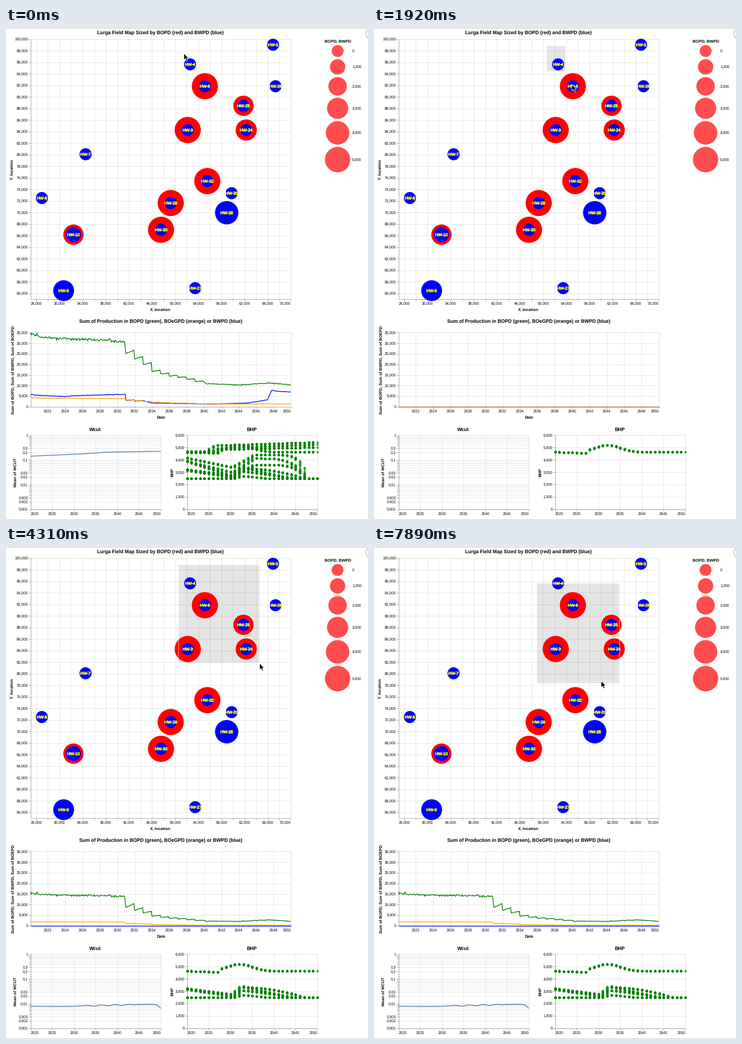
A matplotlib script for the animation above (8000 ms loop, 643x871 px).

```python
import numpy as np
import matplotlib.pyplot as plt
from matplotlib.animation import FuncAnimation
from matplotlib.patches import Circle, Polygon, Rectangle
from matplotlib.patheffects import withStroke

W, H, DPI = 643, 871, 72  # at 72 dpi one point is one pixel
LOOP_MS, FRAMES = 8000, 54
LABEL, AXIS_TITLE, TITLE = 6.6, 7.25, 8.57
HAIR = 0.66

plt.rcParams.update({"font.family": "Liberation Sans", "text.hinting": "none",
                     "lines.solid_capstyle": "butt"})
fig = plt.figure(figsize=((W + 1e-6) / DPI, (H + 1e-6) / DPI), dpi=DPI,
                 facecolor="white")


def layer(zorder):
    ax = fig.add_axes([0, 0, 1, 1], zorder=zorder)
    ax.set(xlim=(0, W), ylim=(H, 0))
    ax.axis("off")
    return ax


def text(ax, x, y, s, size=LABEL, ha="center", bold=False, upright=False, **kw):
    """Place text with its capitals centred on y (or on x when upright)."""
    shift = 0.36 * size
    x, y = (x + shift, y) if upright else (x, y + shift)
    return ax.text(x, y, s, size=size, ha=ha, va="baseline",
                   weight="bold" if bold else "normal",
                   rotation=90 if upright else 0, rotation_mode="anchor", **kw)


def rule(ax, xs, ys, color="#dddddd", z=1):
    ax.plot(xs, ys, color=color, lw=HAIR, zorder=z)


class Panel:
    """A plot rectangle with linear or logarithmic scales in stage pixels."""

    def __init__(self, ax, box, xdom, ydom, log=False):
        self.ax, self.xdom, self.log = ax, xdom, log
        self.x0, self.y0, self.x1, self.y1 = box
        self.ydom = np.log10(ydom) if log else ydom

    def px(self, v):
        return np.interp(v, self.xdom, (self.x0, self.x1))

    def py(self, v):
        return np.interp(np.log10(v) if self.log else v, self.ydom, (self.y1, self.y0))

    def border(self):
        rule(self.ax, [self.x0, self.x1, self.x1], [self.y0, self.y0, self.y1])
        rule(self.ax, [self.x0, self.x0, self.x1], [self.y0, self.y1, self.y1],
             "#888888", 2)

    def x_axis(self, ticks, labelled, fmt="{}"):
        for v in ticks:
            x = self.px(v)
            rule(self.ax, [x, x], [self.y0, self.y1])
            rule(self.ax, [x, x], [self.y1, self.y1 + 3.3], "#888888", 2)
            if v in labelled:
                ha = {self.xdom[0]: "left", self.xdom[1]: "right"}.get(v, "center")
                text(self.ax, x, self.y1 + 8, fmt.format(v), ha=ha)

    def y_axis(self, ticks, labelled, fmt="{:,}"):
        for v in ticks:
            y = self.py(v)
            rule(self.ax, [self.x0, self.x1], [y, y])
            rule(self.ax, [self.x0 - 3.3, self.x0], [y, y], "#888888", 2)
            if v in labelled:
                text(self.ax, self.x0 - 4.5, y, fmt.format(v), ha="right")


YEARS = (2020, 2050)


def prod_panel(ax):
    return Panel(ax, (43.5, 540.5, 506, 672), YEARS, (0, 35000))


def wcut_panel(ax, dy=0):
    return Panel(ax, (43.5, 722.5 + dy, 275, 854 + dy), YEARS, (0.001, 1), log=True)


def bhp_panel(ax, dx=0, dy=0):
    return Panel(ax, (321.5 + dx, 722.5 + dy, 553 + dx, 854 + dy), YEARS, (0, 6000))


def draw_layout(ax, filled):
    """Axes of the lower charts and the legend; they shift when no data is shown."""
    dx, dy = (0, 0) if filled else (-1, -8.7)
    prod, wcut, bhp = prod_panel(ax), wcut_panel(ax, dy), bhp_panel(ax, dx, dy)
    if filled:
        two_years, five_years = range(2022, 2051, 2), range(2020, 2051, 5)
        prod.x_axis(two_years, two_years)
        for panel in (wcut, bhp):
            panel.x_axis(five_years, five_years)
    for panel, step in ((prod, 5000), (bhp, 1000)):
        ticks = range(0, panel.ydom[1] + 1, step)
        panel.y_axis(ticks, ticks)
    minor = [round(m * 10.0 ** e, 3) for e in (-3, -2, -1) for m in range(1, 10)] + [1]
    wcut.y_axis(minor, [v for v in minor if f"{v:g}"[-1] in "123"], "{:g}")
    for panel in (prod, wcut, bhp):
        panel.border()

    text(ax, 275, 690 if filled else 678.5, "Date", AXIS_TITLE, bold=True)
    text(ax, 159, 711.5 + dy, "Wcut", TITLE, bold=True)
    text(ax, 437 + dx, 711.5 + dy, "BHP", TITLE, bold=True)
    text(ax, 16.5, 788 + dy, "Mean of WCUT", AXIS_TITLE, bold=True, upright=True)
    text(ax, 294.5 + dx, 788 + dy, "BHP", AXIS_TITLE, bold=True, upright=True)

    dx *= 1.6
    text(ax, 566 + dx, 23, "BOPD, BWPD", AXIS_TITLE, ha="left", bold=True)
    for i, y in enumerate((40.8, 69, 103.5, 142.5, 186, 233.5)):
        r = 10.5 + 3.3 * i - 0.18 * i * i
        ax.add_patch(Circle((589 + dx, y), r, fc="#ff4c4c", lw=0))
        text(ax, 615 + dx, y, f"{i * 1000:,}", ha="left")


# ---- data -------------------------------------------------------------------

MONTHS = np.arange(2020, 2050.01, 1 / 12)


def curve(knots, t=MONTHS):
    return np.interp(t, *zip(*knots))


def jitter(amount, seed):
    noise = np.random.default_rng(seed).normal(0, amount, MONTHS.size)
    return noise * np.where(MONTHS < 2031, 1, 0.35)


STEPS = (1, 0.8, 0.6, 0.36, 0.28, 0.22, 0.18, 0.13, 0.07)


def oil(start, plateau, first, tail, rise=0.2, bump=1.3, power=1.0):
    """Plateau, then yearly drops with a partial recovery inside each year."""
    knots = [(2020, start), (2021.5, 0.35 * start + 0.65 * plateau),
             (2029, plateau), (2030.85, plateau * 0.965)]
    for k, share in enumerate(STEPS):
        v = tail + (first - tail) * share ** power
        knots += [(2031 + k, v), (2031.93 + k, v * (1 + rise * 0.8 ** k))]
    knots += [(2040.2, tail * 1.04), (2044, tail * 0.98), (2046.8, tail * bump),
              (2048, tail * bump), (2050, tail * 0.98)]
    return curve(knots)


OIL = {-1: oil(34900, 31400, 25200, 10500, rise=0.06, bump=1.06, power=0.85),
       1: np.zeros(MONTHS.size),
       2: oil(5050, 5000, 3750, 950, bump=1.2),
       3: oil(7500, 7050, 4800, 1150),
       5: oil(15600, 14200, 8700, 2100)}
OIL[4] = (OIL[3] + OIL[5]) / 2

WATER_ALL = curve([
    (2020, 6000), (2020.5, 5500), (2024, 4900), (2026, 5400), (2030.95, 5900),
    (2031, 2900), (2031.95, 3400), (2032, 2600), (2032.9, 3000), (2034, 1800),
    (2038, 1500), (2041, 1300), (2045, 1800), (2047.3, 3300), (2047.8, 7900),
    (2048.2, 7400), (2050, 7000)])
WCUT_ALL = curve([(2020, .142), (2030, .17), (2035, .19), (2037, .207), (2050, .226)])
WAVE = 0.4 * np.sin(2 * np.pi * (MONTHS - 2032.2) / 3.2)
WCUT_SOME = 1e-3 * (
    curve([(2020, 7.9), (2028, 7.7), (2032, 8.1), (2044, 9.2), (2048, 9.5), (2049, 9),
           (2050, 6.5)]) + np.where(abs(MONTHS - 2038) < 5.8, WAVE, 0))
FLOOR = 2500


def shut_in(t):
    bump = 4650 + 560 * np.exp(-((t - 2032.5) / 4) ** 2)
    return np.where(t < 2028, 4650 - 12 * (t - 2020), bump)


def flowing(start, low, peak, peak_year, end, bend):
    """Decline, jump to a peak, then sink to the floor pressure."""
    def pressure(t):
        early = curve([(2020, start), (2030.9, low), (peak_year, peak)], t)
        late = np.clip((t - peak_year) / (end - peak_year), 0, 1)
        return early - (peak - FLOOR) * late ** bend
    return pressure


def rising(low, year, middle, high):
    return lambda t: curve([(year, low), (year + 2, middle), (2050, high)], t)


# In the order in which the brush reaches the wells.
PRESSURE = [
    shut_in,
    flowing(3250, 2750, 3430, 2033, 2045, 0.9),
    flowing(FLOOR, FLOOR, 3080, 2033, 2045, 1.2),
    flowing(3180, 2600, 3330, 2033, 2047.5, 2),
    flowing(FLOOR, FLOOR, 2690, 2033, 2039, 1.5),
    rising(4700, 2024.9, 5180, 5430),
    rising(4660, 2025.9, 4980, 5250),
    rising(4630, 2026.9, 4870, 5020),
    flowing(4200, 3400, 4420, 2036, 2047.9, 8),
    flowing(3930, 3000, 4130, 2036, 2047.9, 4),
    flowing(3950, 2700, 3620, 2036, 2047.9, 5),
]


def draw_data(ax, n):
    prod, wcut, bhp = prod_panel(ax), wcut_panel(ax), bhp_panel(ax)
    x = prod.px(MONTHS)
    rate = OIL[n]
    noise = 330 if n < 0 else 0.016 * rate[0]
    water = WATER_ALL + jitter(110, 5) if n < 0 else np.full(MONTHS.size, 60)
    for values, color in ((rate + jitter(noise, 3), "green"), (water, "blue"),
                          (rate * 0.125 + jitter(noise / 12, 4), "orange")):
        ax.plot(x, prod.py(values), color=color, lw=1.32, solid_joinstyle="round")
    if n < 0 or n >= 4:
        share = WCUT_ALL if n < 0 else WCUT_SOME
        ax.plot(wcut.px(MONTHS), wcut.py(share), color="#4c78a8", lw=1.32)
    t = np.append(np.arange(2020, 2050, 1 / 6), 2050)
    for pressure in PRESSURE if n < 0 else PRESSURE[:n]:
        ax.plot(bhp.px(np.floor(t + 1e-6)), bhp.py(pressure(t)), "o", color="green",
                ms=4.2, mew=0, alpha=0.7)


# ---- field map ----------------------------------------------------------------

BRUSHED = {4: (327, 64.5), 6: (353.3, 103.3), 25: (421.8, 138), 3: (322.8, 181),
           24: (426.7, 181)}
WELLS = BRUSHED | {
    5: (474.3, 29.7), 26: (478.7, 103.3), 7: (141.3, 224), 32: (357.6, 271.6),
    31: (400.8, 293), 28: (392, 327.7), 29: (292.6, 310.5), 30: (275.4, 358),
    10: (119.8, 366.6), 8: (63.7, 301.6), 9: (102.4, 466), 27: (336, 461.5)}
RED = {25: 18, 24: 18.8, 10: 18} | dict.fromkeys((6, 3, 32, 29, 30), 23.2)
BLUE = dict.fromkeys(WELLS, 10.7) | {28: 20.7, 10: 13.2, 9: 18.5}

base = layer(0)
rule(base, [0, W], [0.5, 0.5], "#bbbbbb")
base.add_patch(Circle((650, 10), 10.5, fc="none", ec="#999999", lw=0.8))
field = Panel(base, (43.5, 20, 506, 481), (25000, 70000), (55000, 100000))
field.x_axis(range(26000, 70001, 2000), range(26000, 70001, 4000), "{:,}")
field.y_axis(range(56000, 100001, 2000), range(56000, 100001, 2000))
field.border()
text(base, 274.5, 8.3, "Lurga Field Map Sized by BOPD (red) and BWPD (blue)", TITLE, bold=True)
text(base, 274.5, 520, "Sum of Production in BOPD (green), BOeGPD (orange) or BWPD (blue)",
     TITLE, bold=True)
text(base, 274.5, 498.3, "X_location", AXIS_TITLE, bold=True)
text(base, 9.3, 250.5, "Y_location", AXIS_TITLE, bold=True, upright=True)
text(base, 12.7, 606.5, "Sum of BOPD, Sum of BWPD, Sum of BOEPD", AXIS_TITLE,
     bold=True, upright=True)

layouts = {True: layer(1), False: layer(1)}
for filled, ax in layouts.items():
    draw_layout(ax, filled)

data = {n: layer(2) for n in OIL}
for n, ax in data.items():
    draw_data(ax, n)

wells = layer(3)
for z, (color, radii) in enumerate((("red", RED), ("blue", BLUE))):
    for well, r in radii.items():
        wells.add_patch(Circle(WELLS[well], r, fc=color, lw=0, zorder=z))
for well, (x, y) in WELLS.items():
    text(wells, x, y, f"HW-{well}", AXIS_TITLE, color="yellow", zorder=3,
         path_effects=[withStroke(linewidth=0.7, foreground="yellow")])

# ---- moving parts ------------------------------------------------------------

brush_fill = base.add_patch(Rectangle((0, 0), 0, 0, fc="#333333", alpha=0.125, lw=0, zorder=3))
top = layer(4)
brush_edge = top.add_patch(Rectangle((0, 0), 0, 0, fc="none", ec="white", lw=HAIR, zorder=1))
tooltip = [top.add_patch(Rectangle((428.5, 184.5), 35, 20.5, fc="white", ec="#cccccc",
                                   lw=0.8, zorder=2)),
           text(top, 446, 194.7, "HW-24", 7.4, zorder=3)]
ARROW = np.array([(0, 0), (0, 11.7), (2.7, 9.3), (4.6, 13.6), (6.6, 12.7), (4.8, 8.5), (8.3, 8.5)])
cursor = top.add_patch(Polygon(ARROW, fc="black", ec="white", lw=0.8, zorder=4))

PRESS, GRAB = 5, 42
ORIGIN = np.array([306, 31])
CURSOR = [(0, 316, 45), (PRESS, 307, 33), (8, 314, 57.5), (17, 398, 153), (24, 446, 198),
          (32, 453, 211), (34, 453, 210), (38, 428, 184), (GRAB, 426, 187),
          (46, 419.5, 200), (53, 403.5, 237.5)]
CORNER = [(8, 306, 31), (17, 382, 135), (24, 422, 177), (29, 450, 205), (32, 453, 209)]
DRAG = [(GRAB, 0, 0), (46, -5, 4), (50, -11.5, 18), (53, -17, 33)]


def at(path, i):
    when, xs, ys = zip(*path)
    return np.array([np.interp(i, when, xs), np.interp(i, when, ys)])


def update(i):
    low = ORIGIN + at(DRAG, i)
    size = at(CORNER, i) - ORIGIN
    high = low + size
    count = sum(low[0] <= x <= high[0] and low[1] <= y <= high[1]
                for x, y in BRUSHED.values())
    state = -1 if i < PRESS else count
    for n, ax in data.items():
        ax.set_visible(n == state)
    for filled, ax in layouts.items():
        ax.set_visible(filled == (state != 0))
    for rect in (brush_fill, brush_edge):
        rect.set_bounds(*low, *size)
        rect.set_visible(size[0] > 0)
    for part in tooltip:
        part.set_visible(23 <= i <= 25)
    cursor.set_xy(ARROW + at(CURSOR, i))
    return [brush_fill, brush_edge, cursor, *tooltip]


anim = FuncAnimation(fig, update, frames=FRAMES, interval=LOOP_MS / FRAMES,
                     repeat=True, repeat_delay=0, blit=False)
plt.show()
```
